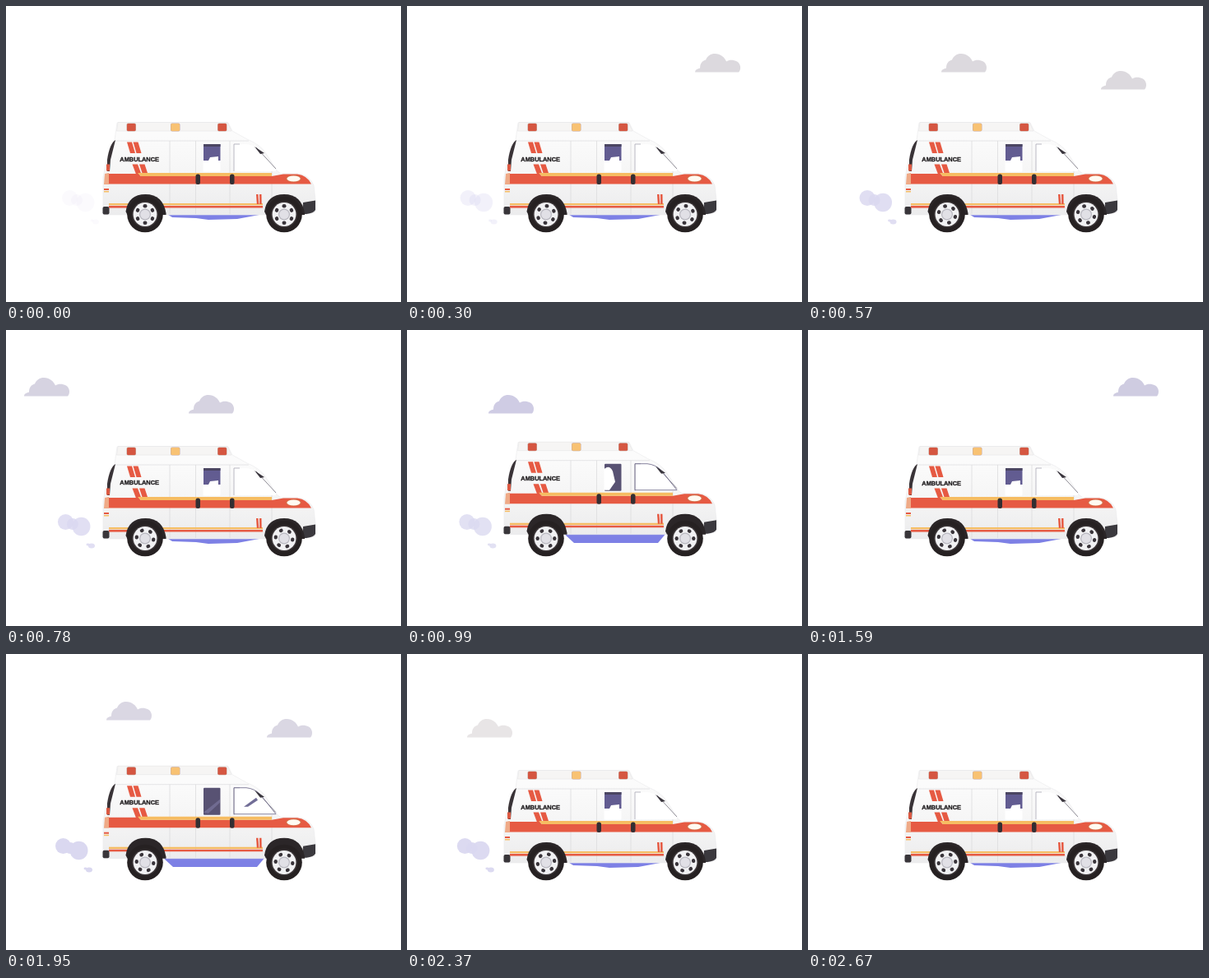
These frames come from a looping animation (480 by 360 pixels, 2.7 s). An HTML page with a canvas:

```html
<!DOCTYPE html>
<html>
<head>
<meta charset="utf-8">
<title>Ambulance</title>
<style>
html, body { margin: 0; width: 100%; height: 100%; overflow: hidden; background: #fff; }
canvas { display: block; width: 480px; height: 360px; }
</style>
</head>
<body>
<canvas id="stage" width="480" height="360"></canvas>
<script>
const ctx = document.getElementById('stage').getContext('2d');
const LOOP = 2700, STEP = 30, CYCLE = 1320, BOB = 264, PUFF = 220;
const RED = '#e65a43', YELLOW = '#f6bc62', DARK = '#2b2628', LINE = '#dcdcde';

// Linear interpolation through [time, value] keys.
function track(keys, t) {
  if (t <= keys[0][0]) return keys[0][1];
  for (let i = 1; i < keys.length; i++) {
    const [t0, a] = keys[i - 1], [t1, b] = keys[i];
    if (t <= t1) return a + (b - a) * (t - t0) / (t1 - t0);
  }
  return keys[keys.length - 1][1];
}

function smooth(a, b, x) {
  const k = Math.min(1, Math.max(0, (x - a) / (b - a)));
  return k * k * (3 - 2 * k);
}

function fillPath(d, fill, stroke, width = 0.7) {
  const path = new Path2D(d);
  if (fill) { ctx.fillStyle = fill; ctx.fill(path); }
  if (stroke) { ctx.strokeStyle = stroke; ctx.lineWidth = width; ctx.stroke(path); }
}

function rect(x, y, w, h, fill, r = 0) {
  ctx.fillStyle = fill;
  ctx.beginPath();
  ctx.roundRect(x, y, w, h, r);
  ctx.fill();
}

function ellipse(x, y, rx, ry, fill) {
  ctx.fillStyle = fill;
  ctx.beginPath();
  ctx.ellipse(x, y, rx, ry, 0, 0, Math.PI * 2);
  ctx.fill();
}

function slash(x, y, w, h, lean) {
  fillPath(`M${x} ${y}h${w}l${lean} ${h}h${-w}z`, RED);
}

function cloud(x, base, tint) {
  ctx.save();
  ctx.translate(x, base);
  fillPath('M0 0C0-3 3-4 6-5C6-11 9-14 13-15C15-20 19-22.5 24-22.5' +
    'C31-22.5 36-18 38-13C41-15 46-15.5 51-13C56-10 56-3 53 0Z', tint);
  ctx.restore();
}

function drawClouds(t) {
  const p = t % CYCLE;
  const hue = [[570, 220], [990, 207], [1590, 207], [1950, 218], [2370, 232]];
  const blue = [[570, 222], [990, 228], [1590, 225], [1950, 227], [2370, 230]];
  const g = track(hue, t);
  const tint = `rgb(${g},${g - 3},${track(blue, t)})`;
  if (p >= 210) cloud(track([[210, 413], [270, 371], [570, 162], [630, 122], [900, -58]], p), 80.5, tint);
  cloud(track([[390, 481], [570, 356], [630, 317], [810, 203], [990, 99], [1050, 73], [1300, -58]], p), 101.5, tint);
}

function drawSmoke(t) {
  const s = t % CYCLE % PUFF;
  ctx.save();
  ctx.globalAlpha = track([[0, 0.12], [30, 0], [55, 0], [110, 0.78], [190, 1]], s);
  ctx.translate(68 - s * 0.042, 0);
  const tint = '#dad8f0';
  ellipse(9.5, 233.5, 9.5, 9.5, tint);
  ellipse(18, 236, 7, 7, tint);
  ellipse(28.5, 239, 11, 11.2, tint);
  ellipse(41, 262.5, 4, 3, tint);
  ellipse(36.5, 261, 2, 1.4, tint);
  ctx.restore();
}

function drawWheel(x, t) {
  ellipse(x, 253.5, 21.8, 21.8, '#262122');
  ellipse(x, 253.5, 16, 16, '#3b3537');
  ellipse(x, 253.5, 14.4, 14.4, '#f1f1f3');
  ctx.save();
  ctx.translate(x, 253.5);
  ctx.rotate(t / CYCLE * Math.PI * 6);
  for (let i = 0; i < 6; i++) {
    ctx.rotate(Math.PI / 3);
    ellipse(0, -10.3, 2.5, 2.2, '#39343a');
  }
  ctx.restore();
  ellipse(x, 253.5, 7, 7, '#b9b8c0');
  ellipse(x, 253.5, 5.8, 5.8, '#e1e0e6');
}

function drawWindows(lift, late) {
  rect(239.5, 167.5, 21, 34, '#fff', 1);
  if (lift < 0.5) {
    fillPath('M240 168H260.500V188H258V183L248 184L246 188H240Z', '#625c91');
    rect(240, 168, 20.5, 3, '#4b4662');
  } else {
    rect(240, 168, 20.5, 33, '#585273', 1);
    if (late) fillPath('M240 174Q246 169 250 177L253 190L246 200H240Z', '#fff');
    else fillPath('M240 198L260 182V186L246 199Z', '#706b91');
  }
  fillPath('M277 168H292Q302 169 309 176L328 199V201H277Z', '#fff');
  fillPath('M304 172L328 198', null, '#77747f', 0.8);
  fillPath('M277 168V201M277 168H284', null, '#a9a8b4', 0.8);
  if (lift > 0.5) {
    fillPath('M277 168H292Q302 169 309 176L328 200H277Z', null, '#676384', 0.8);
    if (!late) fillPath('M289 191L304 180L306 183L294 191Z', '#716d96');
  }
  fillPath('M302 171L314 179L309 180Z', '#39353d');
}

function drawBody(lift, late) {
  const shade = ctx.createLinearGradient(0, 160, 0, 253);
  shade.addColorStop(0, '#fbfbfb');
  shade.addColorStop(0.5, '#f5f5f5');
  shade.addColorStop(1, '#ececed');
  ctx.save();
  ctx.translate(0, -5.3 * lift);

  fillPath('M118 253V208L124 180L132 163L135 142H270L275 152L293 162' +
    'Q308 168 315 178L329 200L334 204H354Q368 205 374 218L376 236L375 251' +
    'L360 254H118Z', shade, '#e9e9eb', 0.6);
  fillPath('M136 141.5H269L274 152H134.500Z', '#f6f5f4', '#e4e4e6', 0.6);
  fillPath('M133 164H281L295 164', null, '#e5e5e7', 1);
  fillPath('M199 164V253M230.500 164V253M272 164V253M323 199V239', null, LINE, 0.8);

  for (const [x, tint] of [[147, '#d55641'], [200.5, '#f8c273'], [257.5, '#d55641']]) {
    rect(x - 0.5, 142.5, 11.5, 10, '#c7aaa1', 2);
    rect(x, 143, 10.5, 9, tint, 1.5);
  }

  // Rear lamp and bumper
  fillPath('M133 163Q126 167 123 187V201H126L127 187Z', '#393337');
  rect(122, 192.5, 4, 8, '#dc5942');
  fillPath('M120 204L125 203V217H119Z', '#efaa87');
  rect(119, 222, 6, 2, RED);
  rect(119, 225, 6, 1.5, YELLOW);
  rect(117.5, 244, 8, 9.5, '#39363a', 2);

  // Livery
  slash(147, 165.5, 6, 13.5, 4);
  slash(154.5, 165.5, 6, 13.5, 4);
  slash(153.5, 192.5, 6.5, 12, 4.5);
  slash(162, 192.5, 6.5, 12, 4);
  fillPath('M125 204H161L164 207H323L337 204.500H354Q366 206 371 216.500H125Z', RED);
  fillPath('M160 203H323V207H164Z', YELLOW);
  rect(125, 240, 26, 2.3, YELLOW);
  rect(125, 243, 25, 2.6, RED);
  rect(190, 240, 122, 2.3, YELLOW);
  rect(190, 243, 122, 2.6, RED);
  slash(304, 229, 2.5, 12, 0.8);
  slash(308, 229, 2.5, 12, 0.2);

  ctx.fillStyle = ctx.strokeStyle = '#242123';
  ctx.font = 'bold 7.4px "Liberation Sans", Arial, sans-serif';
  ctx.lineWidth = 0.35;
  ctx.fillText('AMBULANCE', 138.3, 188.5);
  ctx.strokeText('AMBULANCE', 138.3, 188.5);

  drawWindows(lift, late);
  rect(230.5, 204.5, 5.5, 12.5, '#332e32', 2.5);
  rect(272, 204.5, 5.5, 12.5, '#332e32', 2.5);

  // Headlight and front bumper
  ellipse(349.5, 210, 9.5, 4.6, '#d56c48');
  ellipse(349.5, 210, 8.2, 3.5, '#fffaf1');
  fillPath('M361 239L376 236.500V248Q374 252 365 253H360Z', '#3b393e');

  for (const x of [169.5, 338]) {
    fillPath(`M${x - 24} 250Q${x - 21} 229 ${x} 229Q${x + 21} 229 ${x + 25} 252V254H${x - 22}Z`, DARK);
  }
  ctx.restore();
}

function render(t) {
  const b = t % CYCLE % BOB;
  const lift = smooth(45, 95, b) * (1 - smooth(203, 253, b));
  ctx.fillStyle = '#fff';
  ctx.fillRect(0, 0, 480, 360);
  drawClouds(t);
  drawSmoke(t);
  fillPath(lift > 0.5
    ? 'M190 247L203 259H305L315 247Z'
    : 'M194 252L202 257L231 258L246 260L281 259L313 253Z', '#7d80e5');
  drawBody(lift, b > 165);
  drawWheel(169, t);
  drawWheel(338, t);
}

function tick() {
  const t = performance.now() % LOOP;
  render(Math.floor(t / STEP) * STEP);
  requestAnimationFrame(tick);
}
tick();
</script>
</body>
</html>
```
